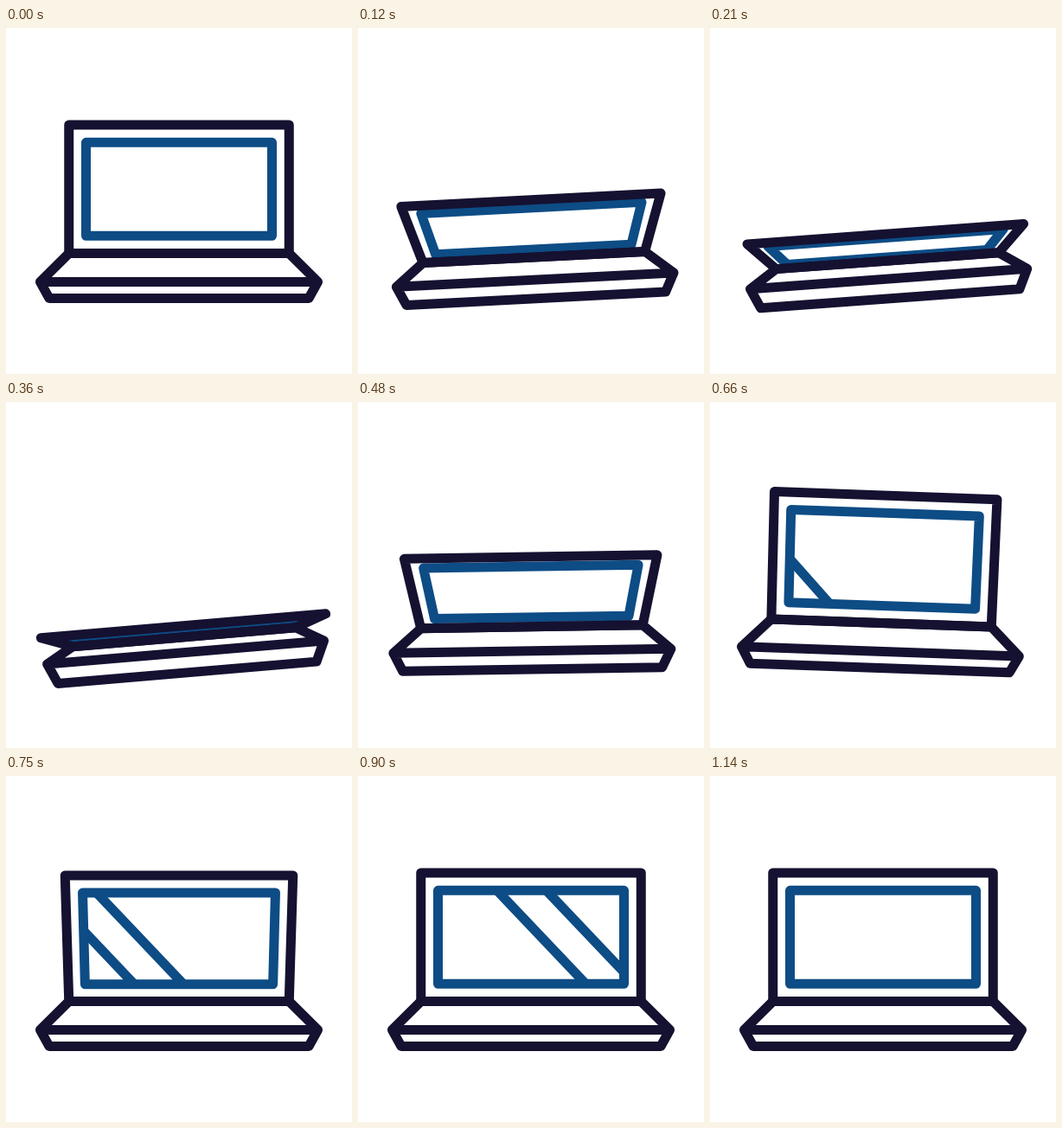
An HTML page that plays this animation: 400x400 px, repeating every 3.41 s.

```html
<!DOCTYPE html>
<html lang="en">
<head>
<meta charset="utf-8">
<title>Laptop</title>
<style>
  html, body { margin: 0; width: 100%; height: 100%; overflow: hidden; background: #fff; }
  svg { display: block; width: 100vw; height: 100vh; }
  path { fill: none; stroke-width: 11; stroke-linejoin: round; stroke-linecap: round; }
  .body { stroke: #151130; }
  .screen { stroke: #0d4c85; }
</style>
</head>
<body>
<svg viewBox="0 0 400 400">
  <clipPath id="glass"><path id="mask"/></clipPath>
  <g id="laptop">
    <g clip-path="url(#glass)"><path id="shine" class="screen"/></g>
    <path id="screen" class="screen"/>
    <path id="lid" class="body"/>
    <path id="base" class="body"/>
  </g>
</svg>
<script>
  const LOOP = 3410, STEP = 30, END = 1140;
  const $ = id => document.getElementById(id);

  const linear = p => p;
  const out = p => 1 - Math.pow(1 - p, 2.3);
  const smooth = p => (1 - Math.cos(Math.PI * p)) / 2;

  // Each key: [time, value, easing used to reach it]
  const tracks = {
    closed: [[0, 0], [360, 1, out], [600, 0, smooth]],
    tilt: [[0, 0], [360, -4.84, out], [600, 3.07, smooth], [750, 0, smooth]],
    lift: [[0, 0], [360, 3.7, out], [600, 7.6, smooth], [750, 0, smooth]],
    bounce: [[600, 0], [750, 1, smooth], [870, 0, smooth]],
    sweep: [[570, -25], [750, 109, linear], [900, 222, linear], [1080, 346, linear], [1140, 383, linear]]
  };

  function at(keys, t) {
    if (t <= keys[0][0]) return keys[0][1];
    for (let i = 1; i < keys.length; i++) {
      const [t0, v0] = keys[i - 1], [t1, v1, ease] = keys[i];
      if (t <= t1) return v0 + (v1 - v0) * ease((t - t0) / (t1 - t0));
    }
    return keys[keys.length - 1][1];
  }

  const line = (...pts) => 'M' + pts.map(p => p.map(n => n.toFixed(2)).join(' ')).join('L');

  // Symmetric trapezoid given half widths and heights
  const trapezoid = (topHalf, top, lowHalf, low) => line(
    [200 - topHalf, top], [200 + topHalf, top],
    [200 + lowHalf, low], [200 - lowHalf, low]) + 'Z';

  function draw(time) {
    const t = Math.min(Math.floor(time / STEP) * STEP, END);
    const closed = at(tracks.closed, t), bounce = at(tracks.bounce, t);

    const front = 293.5 - at(tracks.lift, t);
    const hinge = front - 33 + 15.2 * Math.pow(closed, 1.6);
    const height = 148.5 - 135.5 * closed - 3 * bounce;
    const spread = 38 * closed + 4.5 * bounce;
    const hingeHalf = 127.25 + 2 * closed;

    $('lid').setAttribute('d', trapezoid(127.25 + spread, hinge - height, hingeHalf, hinge));
    $('base').setAttribute('d',
      trapezoid(hingeHalf, hinge, 160.5, front) +
      trapezoid(160.5, front, 150, front + 19 + 4.4 * closed));

    const top = hinge - height * 0.863;
    const screen = trapezoid(107.5 + 0.88 * spread, top, 107.5 + 0.25 * spread, hinge - height * 0.136);
    $('screen').setAttribute('d', screen);
    $('mask').setAttribute('d', screen);

    const x = at(tracks.sweep, t), y = top + 4.5;
    const ray = x => line([x - 19, y - 20], [x + 114, y + 120]);
    $('shine').setAttribute('d', t > 570 && t < END ? ray(x) + ray(x - 57) : '');

    $('laptop').setAttribute('transform', `rotate(${at(tracks.tilt, t).toFixed(3)} 200 200)`);
  }

  const start = performance.now();
  function tick() {
    draw((performance.now() - start) % LOOP);
    requestAnimationFrame(tick);
  }
  tick();
</script>
</body>
</html>
```
